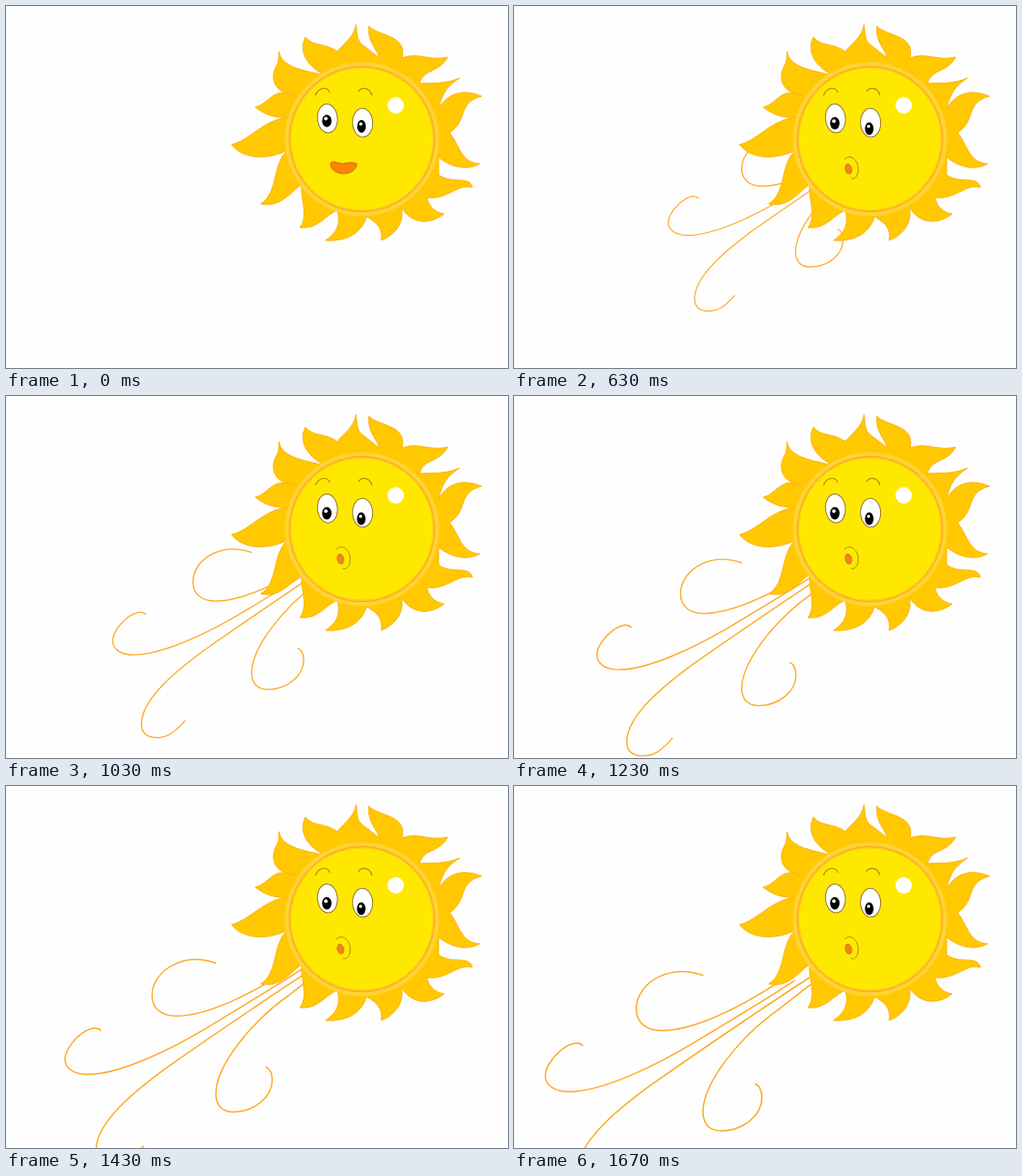
An HTML page that plays this animation: 550x397 px, repeating every 2.2 s.

```html
<!DOCTYPE html>
<html lang="en">
<head>
<meta charset="utf-8">
<title>Blowing sun</title>
<style>
  html, body { margin: 0; width: 100%; height: 100%; overflow: hidden; background: #fefefe; }
  svg { display: block; width: 100vw; height: 100vh; }
</style>
</head>
<body>
<svg viewBox="0 0 550 397">
  <g id="wind" fill="none" stroke="#ffa822" stroke-width="1.4">
    <path d="M250 183C236 178 221 177 206 184C191 191 182.6 204 182.6 216.5C182.6 231 193 238.5 208 238.5C240 238.5 285 216 321 193L350 174"/>
    <path d="M129 254C125 249 119 251 113 254C103 260 91 273 91 284C91 294 101 300 115 300C150 300 205 272 240 251C275 230 310 209 342 188"/>
    <path d="M174 375C161 389 154 394.5 142 394.5C130 394.5 123.8 389 123.8 379C123.8 350 165 317 197 293.5C235 267 300 222 357 185"/>
    <path d="M302 292C307 294 309 300 309 306C309 324 290 339.5 268 339.5C257 339.5 249.7 333 249.7 320.5C249.7 292 285 246 326 217L358 192"/>
  </g>

  <path fill="#ffc800" stroke="#ffb21a" stroke-linejoin="round" d="M383.5 20
    C385 31 384 38 391 43C398 48 404 53 409 57
    C406 46 396 40 397.5 22C407 33 440 31 434 57
    C452 50 464 61 484 56C474 74 458 68 453 85
    C468 84 480 86 497 79C487 86 479 91 474 113
    C484 94 503 91 521 99C494 106 507 125 486 139
    C497 152 498 172 519 173C505 181 488 177 474 166
    L474 185C488 196 508 185 511 199C495 194 484 213 461 210
    C463 218 468 226 480 228C466 239 446 241 433 221
    C437 235 428 251 411 257C413 244 407 238 395 231
    C391 245 378 259 350 257C362 249 367 240 363 224
    C349 230 342 245 322 243C332 230 322 210 324 196
    C313 202 302 222 279 217C299 205 291 172 309 158
    C292 167 262 171 247 152C268 147 282 124 310 122
    C297 123 286 121 273 111C289 107 292 88 315 98
    C296 95 288 82 296 66C299 61 299 56 299 50C302 67 324 70 349 76
    C334 68 319 53 328 34C336 45 350 40 363 50
    C368 43 382 34 383.5 20Z"/>

  <circle cx="390" cy="146" r="84.5" fill="#ffd335"/>
  <circle cx="390" cy="146" r="79.7" fill="#ffc51c" stroke="#fda526"/>
  <circle cx="390" cy="146" r="77.5" fill="#ffe800"/>
  <circle cx="427" cy="109" r="9" fill="#fff"/>

  <g fill="none" stroke="#b18b0c" stroke-width="1.2">
    <path d="M339 98C342 90 351 87 355 95"/>
    <path d="M386 94C389 89 398 88 401 98"/>
  </g>
  <g fill="#fff" stroke="#8c7438">
    <ellipse cx="352.2" cy="123.3" rx="10.9" ry="15.8" transform="rotate(-5 352.2 123.3)"/>
    <ellipse cx="390.7" cy="128" rx="11" ry="15.8" transform="rotate(-2 390.7 128)"/>
  </g>
  <g id="eyeL">
    <ellipse cx="351.5" cy="126" rx="5.2" ry="6.8"/>
    <circle cx="350.5" cy="123.6" r="2" fill="#fff"/>
  </g>
  <g id="eyeR">
    <ellipse cx="389.5" cy="132" rx="4.7" ry="7"/>
    <circle cx="388.8" cy="129.4" r="1.8" fill="#fff"/>
  </g>

  <path id="smile" fill="#ff8205" stroke="#c07a1c" d="M355.5 172C358 169.5 363 172 369 173C375 171.5 381 171 384.5 173C384 180 377 184 369.5 184C361 183.5 355 179 355.5 172Z"/>
  <g id="pucker" stroke="#b5851a" fill="none">
    <path d="M362 168C368 162 376 168 377 177C378 186 373 191 369 189"/>
    <ellipse cx="366.5" cy="178.8" rx="3.4" ry="5.4" fill="#f98020" transform="rotate(-14 366.5 178.8)"/>
  </g>
</svg>
<script>
  const LOOP = 2200;
  const LOOK_STEPS = 10, BLOW_START = 19, BLOW_STEPS = 31;
  const ORIGIN = { x: 731, y: -97 };  // the gusts grow away from this point
  const DRAWN_SCALE = 1.139;          // size at which the gust paths are drawn

  const el = id => document.getElementById(id);
  const show = (id, on) => el(id).setAttribute('visibility', on ? 'visible' : 'hidden');
  const place = (id, value) => el(id).setAttribute('transform', value);
  const clamp = v => Math.max(0, Math.min(1, v));

  // 30 steps per second, switching on multiples of 10 ms
  const stepAt = ms => Math.floor((Math.floor(ms / 10) + 0.5) * 0.3);

  function draw(ms) {
    const step = stepAt(ms % LOOP);
    const look = clamp(step / LOOK_STEPS);
    const blow = clamp((step - BLOW_START) / BLOW_STEPS);
    const blowing = step >= BLOW_START;
    const scale = (1 + 0.24 * blow) / DRAWN_SCALE;

    place('eyeL', `translate(0 ${2.6 * look})`);
    place('eyeR', `translate(${-0.3 * look} ${2.6 * look})`);
    place('wind', `translate(${ORIGIN.x} ${ORIGIN.y}) scale(${scale}) translate(${-ORIGIN.x} ${-ORIGIN.y})`);
    show('wind', blowing);
    show('pucker', blowing);
    show('smile', !blowing);
  }

  const start = performance.now();
  function tick() {
    draw(performance.now() - start);
    requestAnimationFrame(tick);
  }
  tick();
</script>
</body>
</html>
```
